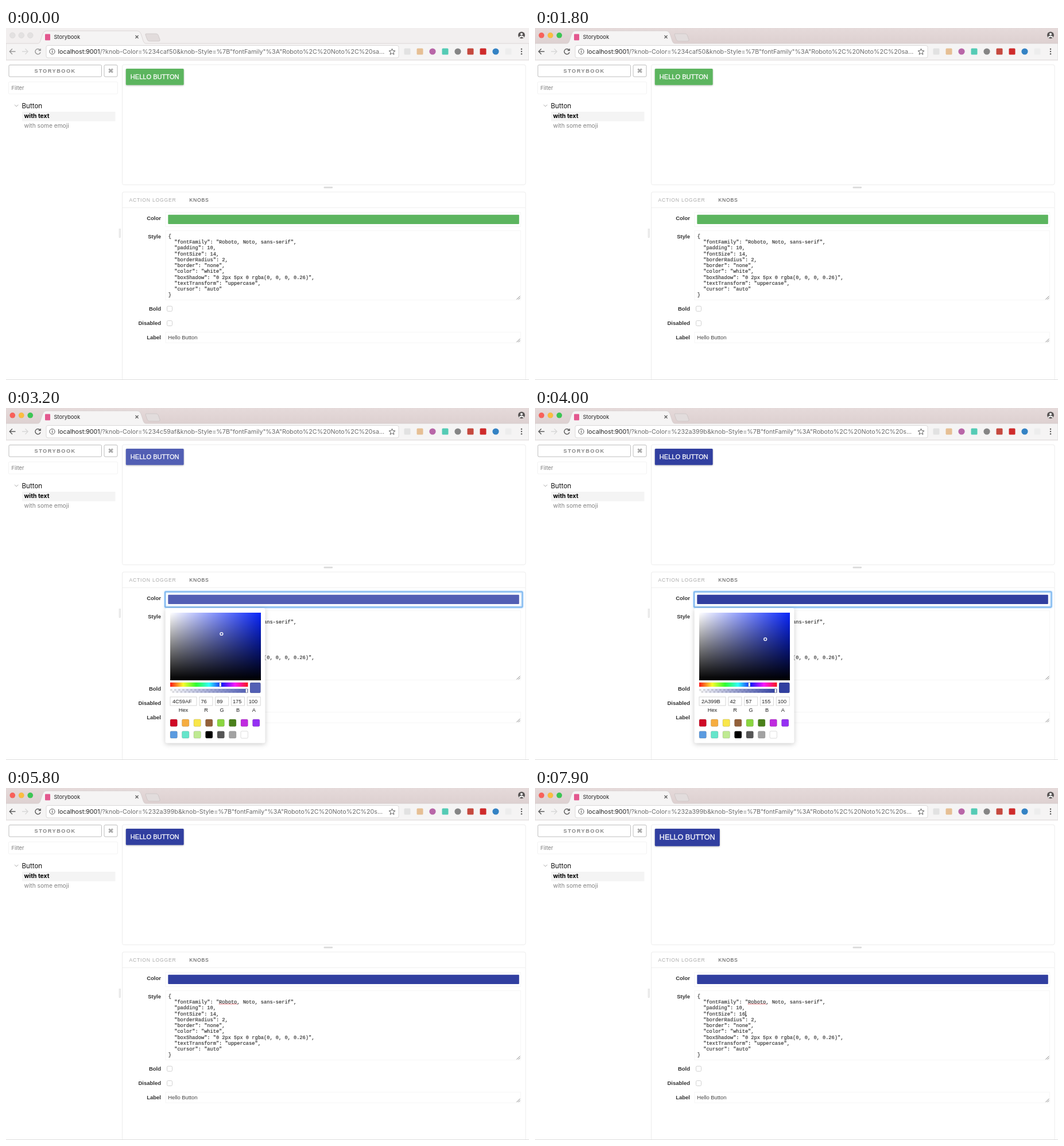
Write an HTML page that moves like this. It is 911x614 px and loops after 8 s.

```html
<!DOCTYPE html>
<html lang="en">
<head>
<meta charset="utf-8">
<title>Storybook knobs</title>
<style>
  html, body { margin: 0; width: 100%; height: 100%; overflow: hidden; background: #fff; }
  svg { display: block; }
  text { font-family: Inter, sans-serif; white-space: pre; }
  .arial, .arial text { font-family: "Liberation Sans", Arial, sans-serif; }
  .code text { font: 8.67px "Liberation Mono", monospace; fill: #2c2c2c; stroke: #2c2c2c; stroke-width: .15px; }
  .labels text { font-size: 9.5px; font-weight: 700; fill: #333; text-anchor: end; }
  .tabs text { font-size: 8.6px; letter-spacing: .79px; }
  .box { fill: #fff; stroke: #f6f6f6; }
  .panel { fill: #fff; stroke: #ececec; }
  .outline { fill: #fff; stroke: #bdbdbd; }
  .check { fill: #fff; stroke: #d0d0d0; }
  .icon { fill: none; stroke: #5c5c5c; stroke-width: 1.4; }
  .grip { stroke: #777; stroke-width: .9; }
  .inactive .chrome { opacity: .6; }
  #button { filter: drop-shadow(0 1.2px 1.4px rgba(0, 0, 0, .24)); }
  #buttonText { fill: #fff; stroke: #fff; stroke-width: .3px; }
  #card { filter: drop-shadow(0 2px 4px rgba(0, 0, 0, .2)); }
  #ring { fill: none; stroke: #7db7f0; stroke-width: 2; filter: drop-shadow(0 0 1.5px #8cc2f5); }
  #fields text { font-size: 9.2px; fill: #222; }
</style>
</head>
<body>
<svg id="stage" width="911" height="614" viewBox="0 0 911 614">
  <defs>
    <linearGradient id="strip" x2="0" y2="1">
      <stop offset="0" stop-color="#e5dada"/><stop offset="1" stop-color="#ddd0d0"/>
    </linearGradient>
    <linearGradient id="toWhite"><stop stop-color="#fff"/><stop offset="1" stop-color="#fff" stop-opacity="0"/></linearGradient>
    <linearGradient id="toBlack" x2="0" y2="1"><stop stop-opacity="0"/><stop offset="1"/></linearGradient>
    <linearGradient id="rainbow"></linearGradient>
    <linearGradient id="fade">
      <stop class="tint-stop" stop-opacity="0"/><stop class="tint-stop" offset="1"/>
    </linearGradient>
    <pattern id="checks" width="7" height="7" x="286" y="490" patternUnits="userSpaceOnUse">
      <path d="M0 0h3.5v3.5h-3.5zM3.5 3.5h3.5v3.5h-3.5z" fill="#dedede"/>
    </pattern>
  </defs>

  <!-- browser frame -->
  <rect id="tabstrip" width="911" height="28"/>
  <g id="lights"></g>
  <path d="M0 27H55C60 27 60 21 64 10Q66 5 70 5H229Q233 5 235 10C239 21 239 27 244 27H911V56H0Z" fill="#f5f4f4" stroke="#d0c9c9" stroke-width=".7"/>
  <path d="M243 12q-1-2 2-2h16q3 0 4 2l3 8q1 3-2 3h-16q-3 0-4-3z" fill="#e2dcdc" stroke="#c8c1c1" stroke-width=".7"/>
  <path d="M0 55.5H911" stroke="#e4e2e2"/>
  <rect x="68" y="10.5" width="9" height="11" rx="1" fill="#e3588f"/>
  <text x="83.5" y="19" font-size="9.35" fill="#222">Storybook</text>
  <path d="M225.5 13l5 5m0-5l-5 5" stroke="#555" stroke-width="1.1"/>
  <circle cx="898" cy="12.5" r="6" fill="#5a5656"/>
  <path d="M894 16.5q4-4 8 0" stroke="#fff" stroke-width="2" fill="none"/>
  <circle cx="898" cy="10.8" r="2" fill="#fff"/>
  <g class="icon">
    <g class="chrome">
      <path d="M16.5 41H6.5M11 36.3L6.3 41L11 45.7"/>
      <path d="M59.2 38.3A4.6 4.6 0 1 0 60 42.3M60.2 36v3.2h-3.4"/>
    </g>
    <path d="M28 41H38M33.5 36.3L38.2 41L33.5 45.7" stroke="#d8d8d8"/>
  </g>
  <rect x="70" y="30.5" width="614" height="21.5" rx="3" fill="#fff" stroke="#dbd9d9"/>
  <circle cx="80.5" cy="41" r="4.6" class="icon" style="stroke-width:1"/>
  <path d="M80.5 40v3.6M80.5 38v1.2" stroke="#5c5c5c" stroke-width="1.2"/>
  <text x="90.5" y="45" font-size="10.7" fill="#6b6b6b"><tspan fill="#222">localhost:9001</tspan><tspan id="query"></tspan></text>
  <path d="M672.5 36l1.5 3.6 3.9.3-3 2.5 1 3.8-3.4-2.1-3.4 2.1 1-3.8-3-2.5 3.9-.3z" class="icon" style="stroke-width:1"/>
  <g id="extensions"></g>
  <g fill="#5a5a5a"><circle cx="898" cy="36.7" r="1.2"/><circle cx="898" cy="41" r="1.2"/><circle cx="898" cy="45.3" r="1.2"/></g>

  <!-- sidebar -->
  <rect x="5" y="64.5" width="161.5" height="20.5" rx="2" class="outline"/>
  <text x="49.5" y="78" class="arial" font-size="9.2" font-weight="700" letter-spacing="1.5" fill="#858585">STORYBOOK</text>
  <rect x="171" y="64.5" width="23" height="20.5" rx="2" class="outline"/>
  <text x="182.5" y="78" text-anchor="middle" font-size="9.5" fill="#666" style="font-family:'DejaVu Sans',sans-serif">⌘</text>
  <rect x="4.5" y="94" width="190" height="21" rx="2" fill="#fff" stroke="#f3f3f3"/>
  <text x="9.5" y="108" font-size="9.3" fill="#7c7c7c">Filter</text>
  <path d="M15 133.8l3.2 3.2 3.2-3.2" fill="none" stroke="#aaa"/>
  <text x="27.5" y="139.5" font-size="11.6" fill="#111">Button</text>
  <rect x="28" y="146" width="162.5" height="16.5" fill="#f4f4f4"/>
  <text x="31.5" y="157" font-size="10.4" font-weight="700" fill="#000">with text</text>
  <text x="31.5" y="173.5" font-size="10.2" fill="#818181">with some emoji</text>
  <rect x="197" y="350.5" width="2.5" height="15" fill="#eee" stroke="#dcdcdc" stroke-width=".6"/>

  <!-- preview -->
  <rect x="202.5" y="64" width="702.5" height="209.5" rx="3" class="panel"/>
  <g id="button" class="arial">
    <rect id="buttonBox" x="208.8" y="71" rx="1.6" class="tint"/>
    <text id="buttonText" x="216.8">HELLO BUTTON</text>
  </g>
  <rect x="553.5" y="276.8" width="15.5" height="2.6" rx="1" fill="#dadada"/>

  <!-- knobs -->
  <rect x="202.5" y="286" width="702.5" height="340" rx="3" class="panel"/>
  <path d="M203 313.5H905" stroke="#f0f0f0"/>
  <g class="arial tabs">
    <text x="214.5" y="303" fill="#aaa">ACTION LOGGER</text>
    <text x="319.5" y="303" fill="#444">KNOBS</text>
  </g>
  <g class="arial labels">
    <text x="270" y="335">Color</text><text x="270" y="366.5">Style</text>
    <text x="270" y="492.5">Bold</text><text x="270" y="518">Disabled</text><text x="270" y="543">Label</text>
  </g>
  <rect x="278" y="321.5" width="618.5" height="25" class="box"/>
  <rect x="282.3" y="325.7" width="611.5" height="16.2" rx="1" class="tint"/>
  <rect x="278" y="353.5" width="618.5" height="121" class="box"/>
  <g id="style" class="code"></g>
  <path id="squiggle" d="M371 376.8H403" stroke="#d9464d" stroke-width="1.3" stroke-dasharray="1.3 1"/>
  <path id="caret" d="M366.9 389V398.5" stroke="#000" stroke-width=".9"/>
  <rect x="280.5" y="485.2" width="9" height="9" rx="2" class="check"/>
  <rect x="280.5" y="510.5" width="9" height="9" rx="2" class="check"/>
  <rect x="278" y="530.5" width="618.5" height="18.5" class="box"/>
  <text x="282.3" y="543" class="arial" font-size="9.4" fill="#444">Hello Button</text>
  <path class="grip" d="M889.5 473.5l6-6m-3 6l3-3M889.5 548l6-6m-3 6l3-3"/>

  <!-- color picker -->
  <g id="picker">
    <rect id="ring" x="277" y="320.5" width="622.5" height="27" rx="1"/>
    <rect id="card" x="277.5" y="349" width="174" height="235.5" rx="3" fill="#fff"/>
    <rect id="hueField" x="286" y="357" width="158" height="118"/>
    <rect x="286" y="357" width="158" height="118" fill="url(#toWhite)"/>
    <rect x="286" y="357" width="158" height="118" fill="url(#toBlack)"/>
    <circle id="spot" r="2.4" fill="none" stroke="#fff" stroke-width="1.4"/>
    <rect x="286" y="478.8" width="135.5" height="7.5" fill="url(#rainbow)"/>
    <rect id="hueMark" y="479" width="3" height="7" fill="#fff" stroke="#777" stroke-width=".5"/>
    <rect x="286" y="489.8" width="135.5" height="7" fill="url(#checks)"/>
    <rect x="286" y="489.8" width="135.5" height="7" fill="url(#fade)"/>
    <rect x="417.5" y="490" width="3" height="6.8" fill="#fff" stroke="#777" stroke-width=".5"/>
    <rect x="425" y="479" width="18.5" height="18" rx="2" class="tint" stroke="#0002" stroke-width=".8"/>
    <g id="fields" class="arial"></g>
    <g id="presets"></g>
  </g>
  <path d="M0 613.5H911" stroke="#ddd"/>
</svg>
<script>
const $ = id => document.getElementById(id);

function add(parent, tag, attrs, text = '') {
  const el = document.createElementNS('http://www.w3.org/2000/svg', tag);
  for (const key in attrs) el.setAttribute(key, attrs[key]);
  el.textContent = text;
  return $(parent).appendChild(el);
}
function set(id, attrs) {
  for (const key in attrs) $(id).setAttribute(key, attrs[key]);
}
const show = (id, on) => set(id, { visibility: on ? 'visible' : 'hidden' });
const progress = (t, from, to) => Math.min(1, Math.max(0, (t - from) / (to - from)));
const mix = (a, b, k) => a + (b - a) * k;

function hsv(h, s, v) {
  const channel = n => {
    const k = (n + h / 60) % 6;
    return Math.round(255 * v * (1 - s * Math.max(0, Math.min(k, 4 - k, 1))));
  };
  return [channel(5), channel(3), channel(1)];
}
function onScreen([r, g, b]) {
  const soften = c => c + 5 + .11 * Math.max(0, g - c);
  return `rgb(${[soften(r), g + 6, soften(b)].map(c => Math.min(255, Math.round(c)))})`;
}

const lights = ['#f9605a', '#fbbd3f', '#3bc653'].map((color, i) =>
  ({ color, el: add('lights', 'circle', { cx: 11.3 + 15.5 * i, cy: 12.8, r: 4.8, 'stroke-width': .6 }) }));

['#e2e2e2', '#e6bf94', '@#b866a8', '#55cbb5', '@#858585', '#c5493f', '#cf2b2b', '@#3583c4', '#ededed'].forEach((spec, i) => {
  const cx = 699 + 22 * i, fill = spec.replace('@', '');
  if (spec[0] === '@') add('extensions', 'circle', { cx, cy: 41, r: 5.6, fill });
  else add('extensions', 'rect', { x: cx - 5.5, y: 35.5, width: 11, height: 11, rx: 1.5, fill });
});

const styleLines = ['{', '  "fontFamily": "Roboto, Noto, sans-serif",', '  "padding": 10,', '', '  "borderRadius": 2,',
  '  "border": "none",', '  "color": "white",', '  "boxShadow": "0 2px 5px 0 rgba(0, 0, 0, 0.26)",',
  '  "textTransform": "uppercase",', '  "cursor": "auto"', '}'
].map((line, i) => add('style', 'text', { x: 282.8, y: 365.7 + 10.27 * i }, line));

for (let i = 0; i <= 6; i++)
  add('rainbow', 'stop', { offset: i / 6, 'stop-color': onScreen(hsv(i * 60, .93, .96)) });

const fields = ['Hex', 'R', 'G', 'B', 'A'].map((label, i) => {
  const x = i ? 309.2 + 27.75 * i : 286, width = i ? 23 : 46;
  add('fields', 'rect', { x, y: 504, width, height: 15, fill: '#fff', stroke: '#ccc', 'stroke-width': .8 });
  add('fields', 'text', { x: x + width / 2, y: 529.5, 'text-anchor': 'middle' }, label);
  return add('fields', 'text', { x: x + (i ? 2.5 : 4), y: 515 });
});

['#cf0a26', '#f6ad40', '#f9e64a', '#93603a', '#8bd640', '#4a801a', '#bf2bdf', '#9530f3',
 '#5b9be0', '#66e5cb', '#bfea92', '#000', '#555', '#a2a2a2', '#fff'].forEach((fill, i) =>
  add('presets', 'rect', { x: 286 + 20.5 * (i % 8), y: i < 8 ? 543 : 563.7, width: 12.4, height: 12.4, rx: 2,
    fill, stroke: '#0003', 'stroke-width': .7 }));

const ACTIVATE = 900, OPEN = 1900, CLOSE = 5200, FOCUS = 5300, ERASE = 7400, TYPE = 7700;
const SCALE = .792;

function drawButton(size) {
  const pad = 10 * SCALE, em = size * SCALE;
  set('buttonBox', { width: 2 * pad + 7.668 * em, height: 2 * pad + 1.15 * em });
  set('buttonText', { y: 71 + pad + .905 * em, 'font-size': em });
}

function drawColor(h, s, v, query) {
  const rgb = hsv(h, s, v), color = onScreen(rgb);
  const hex = rgb.map(c => c.toString(16).padStart(2, '0')).join('');
  document.querySelectorAll('.tint').forEach(el => el.setAttribute('fill', color));
  document.querySelectorAll('.tint-stop').forEach(el => el.setAttribute('stop-color', color));
  set('hueField', { fill: onScreen(hsv(h, 1, .96)) });
  set('spot', { cx: 286 + 158 * s, cy: 357 + 118 * (1 - v) });
  set('hueMark', { x: 284.5 + 135.5 * h / 360 });
  [hex.toUpperCase(), ...rgb, 100].forEach((value, i) => fields[i].textContent = value);
  $('query').textContent = `/?knob-Color=%23${hex}&knob-Style=%7B"fontFamily"%3A"Roboto%2C%20Noto%2C%20${query}...`;
}

function draw(t) {
  const active = t >= ACTIVATE;
  $('stage').classList.toggle('inactive', !active);
  set('tabstrip', { fill: active ? 'url(#strip)' : '#f2efef' });
  lights.forEach(({ color, el }) => {
    el.setAttribute('fill', active ? color : '#e3e1e1');
    el.setAttribute('stroke', active ? '#0001' : '#d6d4d4');
  });

  const hue = progress(t, 2600, 3100), shade = progress(t, 3300, 3900);
  drawColor(mix(122.42, 232.1, hue), mix(99 / 175, 113 / 155, shade), mix(175, 155, shade) / 255, shade ? 's' : 'sa');
  show('picker', t >= OPEN && t < CLOSE);

  const size = t < ERASE ? 14 : t < TYPE ? 1 : 16;
  drawButton(size);
  styleLines[3].textContent = `  "fontSize": ${size},`;
  const lastKey = t >= TYPE ? TYPE : t >= ERASE ? ERASE : FOCUS;
  show('squiggle', t >= FOCUS);
  show('caret', t >= FOCUS && (t - lastKey) % 1000 < 500);
  set('caret', { transform: `translate(${size === 1 ? -5.2 : 0})` });
}

let shown = -1;
function tick() {
  const t = Math.floor(performance.now() % 8000 / 100) * 100;
  if (t !== shown) draw(shown = t);
  requestAnimationFrame(tick);
}
tick();
</script>
</body>
</html>
```
